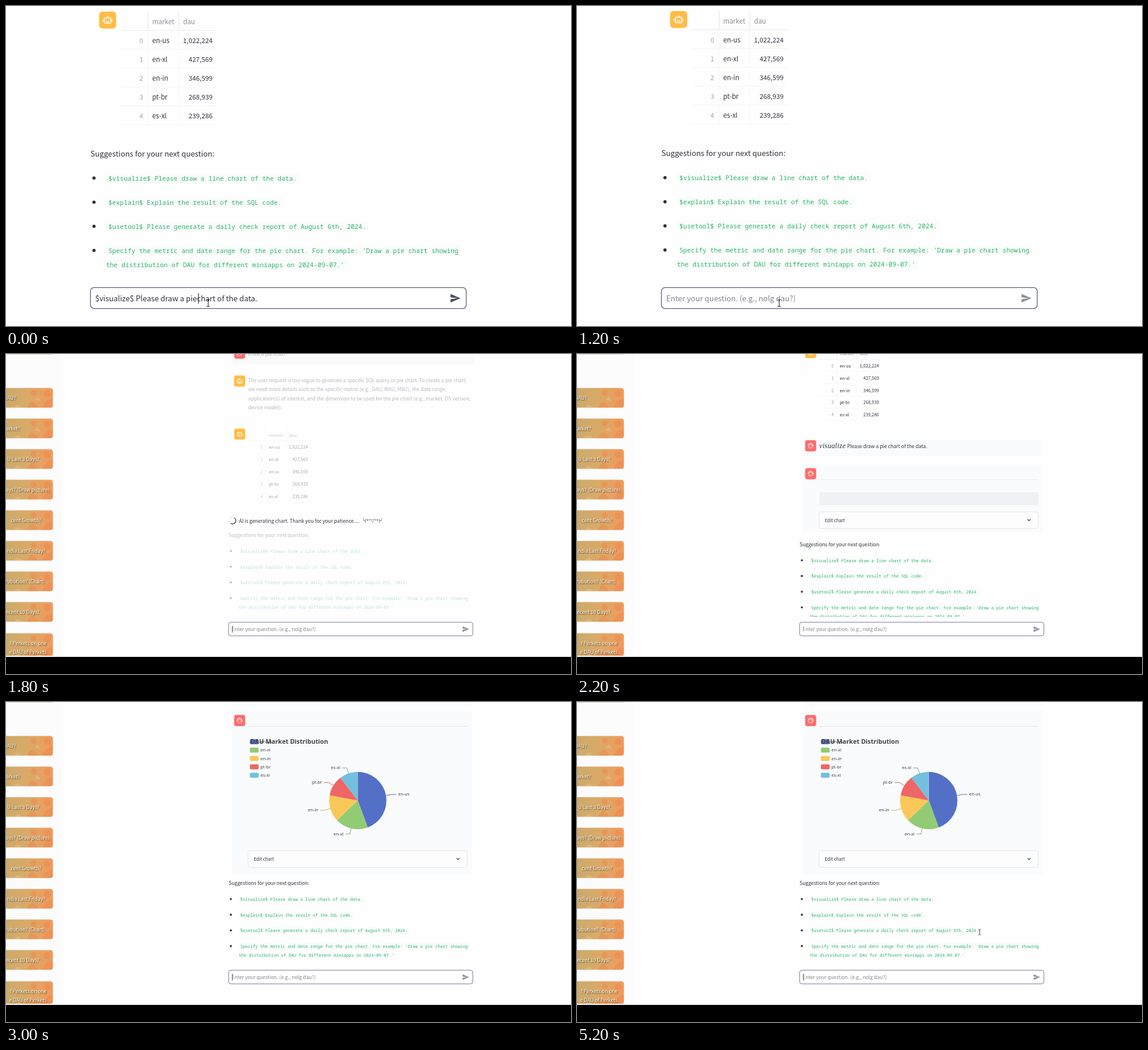
These frames come from a looping animation (960x544 px, 5600 ms). An HTML page:

```html
<!DOCTYPE html>
<html lang="en">
<head>
<meta charset="utf-8">
<title>Chat chart</title>
<style>
  html, body { margin: 0; width: 100%; height: 100%; overflow: hidden; background: #fefefe; }
  svg { display: block; width: 960px; height: 544px; fill: #31333f; font-family: "Noto Sans CJK SC", "Noto Sans CJK JP", "Noto Sans CJK", "Noto Sans", sans-serif; }
  text { white-space: pre; }
  .code { font-family: "Noto Sans Mono", "DejaVu Sans Mono", monospace; fill: #2eb56a; }
  .plot { font-family: "Noto Sans", "Open Sans", sans-serif; fill: #444; }
  .math { font-family: "Liberation Serif", serif; font-style: italic; letter-spacing: .35px; }
  .face { font-family: "DejaVu Sans", sans-serif; }
  .side { fill: #fff; text-shadow: .8px .8px 1.5px #4a3010; }
</style>
</head>
<body>
<svg viewBox="0 0 960 544" id="stage"></svg>
<script>
const LOOP = 5600, ZOOM = .65, BODY = 12.9, SMALL = 8.39, CODE = 10.9;
const $ = id => document.getElementById(id);

const text = (x, y, s, size, attrs = "") =>
  `<text x="${x}" y="${y}" font-size="${size}" ${attrs}>${s}</text>`;
const rect = (x, y, w, h, fill, attrs = "") =>
  `<rect x="${x}" y="${y}" width="${w}" height="${h}" fill="${fill}" ${attrs}/>`;
const line = (d, color, w = 1) => `<path d="${d}" fill="none" stroke="${color}" stroke-width="${w}"/>`;
const group = (id, body, attrs = "") => `<g id="${id}" ${attrs}>${body}</g>`;

// Avatars are 29 units wide and centred on their position.
const avatar = (x, y, k, color, art) =>
  `<g transform="translate(${x} ${y}) scale(${k})">${rect(-14.5, -14.5, 29, 29, color, 'rx="6"')}
   <g fill="none" stroke="#fff" stroke-width="1.5" stroke-linecap="round">${art}</g></g>`;
const bot = (x, y, k = 1) => avatar(x, y, k, "#ffbd45",
  `<rect x="-5.5" y="-4" width="11" height="9.5" rx="2"/><path d="M0-4V-7M-7.5-.5V2M7.5-.5V2M-2.5 2.8H2.5M-2.4-.6h.1M2.4-.6h.1"/>`);
const user = (x, y) => avatar(x, y, ZOOM, "#ff6c6c",
  `<circle r="6.3"/><path d="M-6-1.5Q-2-2-1-5Q2-1.5 6-2M-2.3 1.5h.1M2.3 1.5h.1"/>`);

const DATA = [
  ["en-us", 1022224, "#5470c6"], ["en-xl", 427569, "#91cc75"], ["en-in", 346599, "#fac858"],
  ["pt-br", 268939, "#ee6666"], ["es-xl", 239286, "#73c0de"]
];

function table() {
  const size = 11.3, grey = 'fill="#8d8e97"';
  let s = line("M241.5 10V42M293.5 10V42", "#e4e4e8") + line("M196 41.5H358", "#ececef") +
    line("M241.5 42V203M293.5 42V203", "#f8f8f9") +
    text(248.5, 31, "market", size, grey) + text(301, 31, "dau", size, grey);
  DATA.forEach(([name, n], i) => {
    const y = 63 + 32 * i;
    s += line(`M196 ${y + 10.5}H358`, "#f6f6f8") +
      text(233, y, i, size, 'text-anchor="end" fill="#a0a1a9"') + text(248.5, y, name, size) +
      text(351, y, n.toLocaleString("en-US"), size, 'text-anchor="end"');
  });
  return s;
}

function suggestions() {
  const code = (x, y, s) => rect(x - 4, y - 13, s.length * CODE * .6 + 8, 18, "#fbfcfc", 'rx="3"') +
    text(x, y, s, CODE, 'class="code"');
  const items = [
    "$visualize$ Please draw a line chart of the data.",
    "$explain$ Explain the result of the SQL code.",
    "$usetool$ Please generate a daily check report of August 6th, 2024.",
    "Specify the metric and date range for the pie chart. For example: 'Draw a pie chart showing"
  ];
  return text(143.5, 256, "Suggestions for your next question:", BODY) +
    items.map((s, i) => `<circle cx="149.5" cy="${292.5 + 41 * i}" r="2.8"/>` +
      code(174, 297 + 41 * i, s)).join("") +
    code(170, 443.5, "the distribution of DAU for different miniapps on 2024-09-07.'");
}

const wait = () =>
  `<circle cx="154" cy="213" r="8.6" fill="none" stroke="#e3e3e7" stroke-width="2"/>` +
  group("spin", line("M154 204.4a8.6 8.6 0 0 1 0 17.2", "#3c3e4c", 2)) +
  text(171, 218, "AI is generating chart. Thank you for your patience....", BODY) +
  text(493, 217, "╰(*°▽°*)╯", 11.3, 'class="face"');

const input = () =>
  rect(140, 465, 650, 106, "#fefefe") +
  rect(143.5, 478.7, 638.5, 35.6, "#fff", 'rx="6" stroke="#5d6085" stroke-width="1.3"') +
  text(151.5, 502, "", BODY, 'id="field"') +
  `<path id="send" transform="translate(753.7 487.2) scale(.8)" d="M2 21 23 12 2 3v7l15 2-15 2z"/>` +
  rect(0, 488, 1.2, 18, "#31333f", 'id="caret"');

function sidebar() {
  const labels = [["DAU?", 17], ["arket?", 24], ["U Last 3 Days?", 57], ["ays? (Draw picture)", 74],
    ["cent Growth?", 60], ["ndia Last Friday?", 67], ["rubution? (Chart)", 66], ["ecent 10 Days?", 57]];
  const label = (s, x, y) => text(x, y, s, SMALL, 'class="side" text-anchor="end"');
  const button = (y, h) => `<g transform="translate(0 ${y})">` +
    rect(-8, 0, 87.5, h, "url(#warm)", 'rx="4" stroke="#dfb48a" stroke-width=".8"') +
    `<g fill="#f0884c" opacity=".5"><circle cx="47" cy="8" r="5"/><circle cx="70" cy="9" r="6"/>
     <path d="M36 ${h}q4-12 10-9t8 9zM62 ${h}q5-14 17-15v15z"/></g>
     <path d="M14 ${h}q6-9 12 0zM48 20l6-6 5 8z" fill="#e8bd80" opacity=".6"/></g>`;
  return rect(0, 0, 97, 515, "#fcfcfd") + rect(0, 0, 79, .8, "#d8c3b0") +
    labels.map(([s, x], i) => button(58 + 52 * i, 33) + label(s, x, 78 + 52 * i)).join("") +
    button(475, 38) + label("f Perkets on one", 69, 495) + label("e DAU of Perkets", 69, 510) +
    rect(0, 513, 960, 2, "#f1f1f2") + rect(0, 515, 960, 29, "#000");
}

function history() {
  const pale = 'fill="#b7b8bf"';
  return rect(384, -10, 411, 28, "#fafafb") + user(397, -1.5) + text(411.5, 3, "Draw a pie chart", SMALL, pale) +
    bot(397, 46, ZOOM) + [
      "The user request is too vague to generate a specific SQL query or pie chart. To create a pie chart,",
      "we need more details such as the specific metric (e.g., DAU, WAU, MAU), the date range,",
      "application(s) of interest, and the dimension to be used for the pie chart (e.g., market, OS version,",
      "device model)."
    ].map((s, i) => text(411.5, 48 + 15.3 * i, s, SMALL, pale)).join("");
}

const expander = y => rect(411.5, y, 372, 28.5, "#fdfdfe", 'rx="4" stroke="#e3e4e9" stroke-width="1"') +
  text(421, y + 17.3, "Edit chart", 7.55) + line(`M765.5 ${y + 12.6}l2.6 2.7 2.6-2.7`, "#31333f", 1.2);

const pending = () =>
  rect(384, 146, 407, 28, "#fafbfc") + user(397, 156) +
  text(411.5, 159.5, "visualize", 12, 'class="math"') +
  text(459, 159.5, "Please draw a pie chart of the data.", SMALL) +
  rect(384, 188, 407, 115, "#fafbfc") + user(397, 203.5) + line("M412 213.5H784", "#ebecf0") +
  rect(412, 235, 372, 22, "#f0f1f4") + expander(268.2);

function chart() {
  const cx = 597.7, cy = 167.5, r = 48.7, total = DATA.reduce((a, d) => a + d[1], 0);
  const at = (f, q) => [cx + q * Math.sin(f * 2 * Math.PI), cy - q * Math.cos(f * 2 * Math.PI)];
  let sum = 0, s = rect(384, 0, 407, 6, "#fafbfc") + rect(384, 16, 407, 277, "#fafbfc") +
    user(397, 31.5) + line("M412 41.5H784", "#e3e4e8");
  DATA.forEach(([name, n, color], i) => {
    const a = sum / total, b = (sum += n) / total, mid = (a + b) / 2;
    const side = mid < .5 ? 1 : -1, [x, y] = at(mid, r + 9.75);
    const lead = `M${at(mid, r)}L${x} ${y}h${8 * side}`;
    s += `<path d="M${cx} ${cy}L${at(a, r)}A${r} ${r} 0 0 1 ${at(b, r)}Z" fill="${color}"/>` +
      line(lead, color, .8) + line(lead, "rgba(90,90,90,.45)", .6) +
      text(x + 11 * side, y + 2.3, name, 7.4, `class="plot" text-anchor="${side > 0 ? "start" : "end"}"`) +
      rect(414.3, 63.2 + 14.25 * i, 15, 8.6, color, 'rx="2.5"') +
      text(432.3, 70 + 14.25 * i, name, 7.4, 'class="plot"');
  });
  return s + text(415, 71.3, "DAU Market Distribution", 10.7, 'class="plot" font-weight="700"') + expander(252.7);
}

$("stage").innerHTML =
  `<defs><linearGradient id="warm"><stop stop-color="#c9aa6c"/><stop offset=".5" stop-color="#d9aa68"/>
   <stop offset="1" stop-color="#f09a5c"/></linearGradient></defs>` +
  rect(0, 0, 960, 544, "#fefefe") +
  group("history", history()) + group("pending", pending()) + group("chart", chart()) +
  group("world",
    group("result", bot(172.7, 24) + group("rows", table())) + group("wait", wait()) +
    group("tips", suggestions()) + input()) +
  group("sidebar", sidebar()) +
  group("cursor", line("M-2.8-6q2 0 2.8 .8q.8-.8 2.8-.8M0-5V5M-2.8 6q2 0 2.8-.8q.8 .8 2.8 .8", "#2b2b33", 1.1));

// Each track is a list of [start time, value]; values hold until the next step.
const HINT = "Enter your question. (e.g., nolg dau?)";
const tracks = {
  field: [[0, "$visualize$ Please draw a piechart of the data."],
    [400, "$visualize$ Please draw a pie chart of the data."], [600, HINT]],
  caret: [[0, 326.5], [400, 330], [600, null], [1800, 152.5], [2200, null], [3000, 152.5], [3200, null],
    [4000, 152.5], [4400, null], [5000, 152.5]],
  table: [[0, 0], [1200, -1], [1400, -37.5], [2200, -250.5], [2400, null]],
  tips: [[0, 0], [1000, -.8], [1400, 0], [2200, 24.3], [2400, 0]],
  rowFade: [[0, 1], [1400, .6], [1600, .42], [2200, 1]],
  tipFade: [[0, 1], [1400, .6], [1600, .3], [2200, 1]],
  page: [[0, ""], [1400, "wait"], [1800, "history"], [2200, "pending"], [2400, "chart"]],
  cursor: [[0, [343.5, 505, 1]], [1800, null], [4000, [587, 389, .75]],
    [4200, [634, 414, .75]], [4400, [629, 427, .75]], [4800, [630, 437, .75]],
    [5000, [646, 400, .75]], [5200, [684, 391.5, .75]]]
};
const pick = (name, t) => tracks[name].filter(step => step[0] <= t).pop()[1];
const show = (id, on) => $(id).setAttribute("display", on ? "inline" : "none");
const move = (id, value) => $(id).setAttribute("transform", value);

function render(t) {
  const page = pick("page", t), zoomed = t >= 1800;
  for (const id of ["history", "pending", "chart"]) show(id, page === id);
  show("wait", page === "wait" || page === "history");
  show("sidebar", zoomed);
  move("world", zoomed ? `translate(284.9 144.85) scale(${ZOOM})` : "");
  move("spin", `rotate(${Math.floor(t / 200) * 72 - 618} 154 213)`);

  const y = pick("table", t);
  show("result", y !== null);
  move("result", `translate(0 ${y || 0})`);
  move("tips", `translate(0 ${pick("tips", t)})`);
  $("rows").setAttribute("opacity", pick("rowFade", t));
  $("tips").setAttribute("opacity", pick("tipFade", t));

  const value = pick("field", t), empty = value === HINT;
  if ($("field").textContent !== value) $("field").textContent = value;
  $("field").setAttribute("fill", empty ? "#83848e" : "#31333f");
  $("send").setAttribute("fill", empty ? "#8b8c9c" : "#4a4c60");

  const caret = pick("caret", t), cursor = pick("cursor", t);
  show("caret", caret !== null);
  $("caret").setAttribute("x", caret || 0);
  show("cursor", cursor);
  if (cursor) move("cursor", `translate(${cursor[0]} ${cursor[1]}) scale(${cursor[2]})`);
}

const start = performance.now();
function tick() {
  render((performance.now() - start) % LOOP);
  requestAnimationFrame(tick);
}
tick();
</script>
</body>
</html>
```
